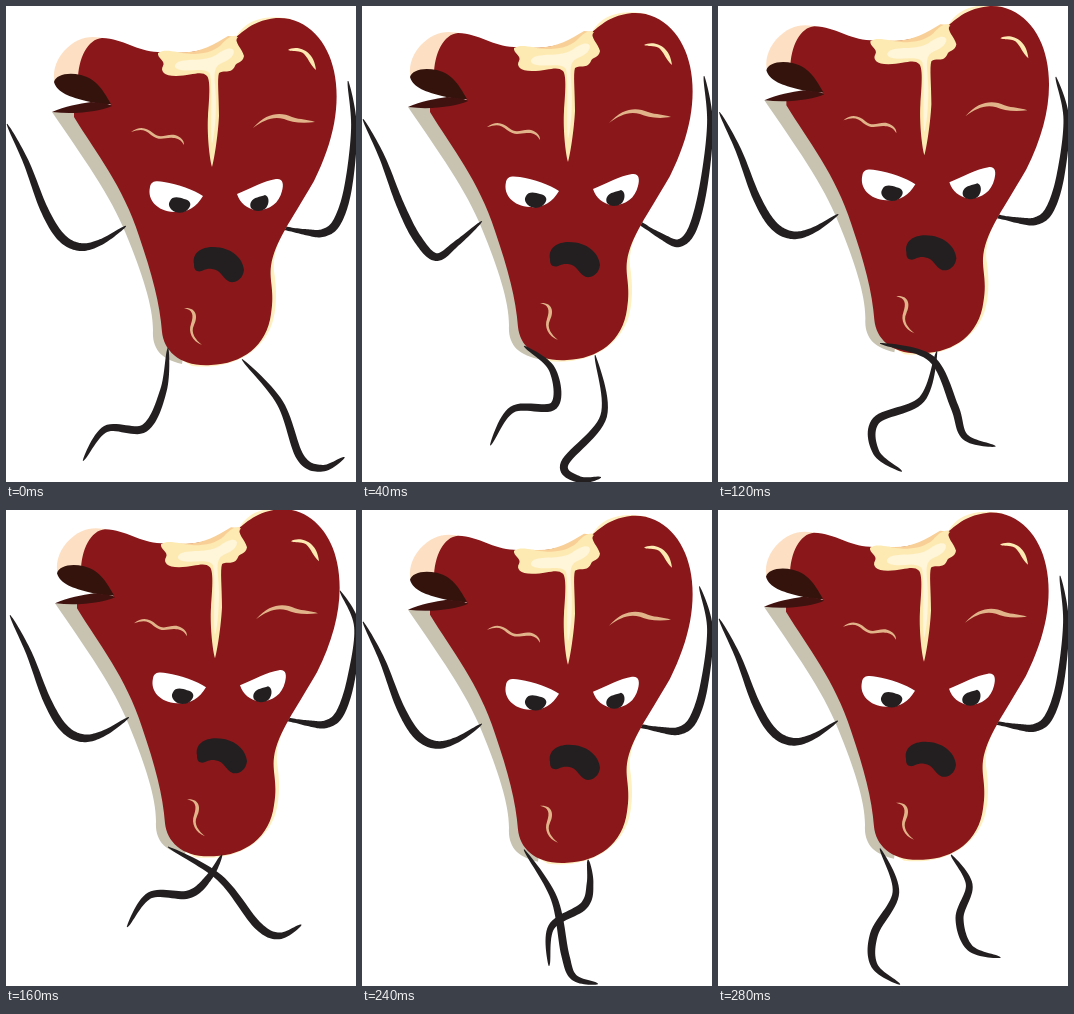
Recreate the animation shown at these times as an HTML page with a canvas. Size 350 by 476 pixels, loop 320 ms.

```html
<!DOCTYPE html>
<html lang="en">
<head>
<meta charset="utf-8">
<title>Walking steak</title>
<style>
html, body { margin: 0; width: 100%; height: 100%; overflow: hidden; background: #fff; }
canvas { display: block; width: 350px; height: 476px; }
</style>
</head>
<body>
<canvas id="stage"></canvas>
<script>
const W = 350, H = 476, STEP = 40, STEPS = 8;
const INK = '#231f20', RED = '#8a171a', CREAM = '#fff0c2', PEACH = '#fde0c4', TAN = '#e2b48a';
const { sin, cos, PI, max } = Math;

const canvas = document.getElementById('stage');
const ctx = canvas.getContext('2d');
const dpr = window.devicePixelRatio || 1;
canvas.width = W * dpr;
canvas.height = H * dpr;

// Fill and path, painted from back to front.
const shapes = [
  [CREAM, `M230 31C240 13 260 8 285 13L310 160L281 220C270 238 267 252 268 265
    C271 283 271 303 266 318C255 348 224 364 186 360L160 345Z`],
  [PEACH, `M101 33C85 29 72 30 58 45C49 55 46 68 49 77L78 73Z`],
  ['#c7c3b0', `M46 106C76 150 105 190 120 228C136 267 147 300 147 324
    C146 342 154 353 176 358L180 330L110 160L72 107Z`],
  [RED, `M96 32C118 33 130 45 152 46C185 50 205 42 222 36C235 30 242 15 270 12
    C300 10 322 35 328 65C335 98 328 135 308 175C285 215 269 235 265 260
    C263 275 269 285 265 308C261 340 236 358 205 359C174 361 158 345 156 326
    C154 298 146 268 133 230C117 180 90 147 68 111L68 105L105 99
    C92 90 82 82 72 75C72 52 82 33 96 32Z`],
  ['#35130d', `M48 76C50 69 61 66 75 69C92 73 99 88 105 98C98 99 89 97 80 95C65 91 51 87 48 76Z`],
  ['#3f120f', `M46 106C59 100 73 98 85 96C94 97 102 97 106 100C95 105 70 109 46 106Z`],
  ['#f8cf96', `M170 46C193 48 207 39 222 30L232 31L222 46L190 53Z`],
  ['#fdeab2', `M152 47C160 42 170 47 185 48C197 48 207 46 215 39C221 32 227 29 231 30
    C228 37 236 42 238 50C237 57 230 56 229 60C225 69 218 63 213 67
    C211 73 213 90 213 110C212 130 208 155 206 161C203 150 201 125 202 110
    C203 95 205 75 201 70C195 64 186 70 170 70C158 70 154 65 157 60C160 55 151 52 152 47Z`],
  ['#fff5d8', `M172 56C182 52 198 56 210 49C218 43 226 40 228 45C228 52 220 55 214 58
    C205 63 210 76 210 96C210 115 208 132 206 138C204 122 207 82 204 68
    C199 61 187 66 175 64C168 63 167 59 172 56Z`],
  ['#fdeab2', `M282 44C290 39 308 43 310 64C304 59 302 51 297 47C291 44 286 46 282 44Z`],
  [TAN, `M247 122C261 106 275 106 286 111C295 114 301 113 309 116C295 118 285 116 278 113C267 110 258 114 247 122Z`],
  [TAN, `M125 126C134 119 141 122 147 127C155 134 161 127 169 129C175 131 178 134 178 139
    C175 134 172 132 167 132C159 131 154 136 145 129C139 123 134 123 125 126Z`],
  [TAN, `M178 302C191 301 192 311 188 319C184 327 190 334 196 339C186 335 182 326 185 318C188 309 187 304 178 302Z`],
  ['#fff', `M144 181C145 174 152 175 158 176C172 178 188 184 197 190C190 202 180 207 168 206C151 205 141 194 144 181Z`],
  ['#fff', `M231 188C245 182 258 175 270 173C277 172 278 178 276 185C273 198 262 205 250 204C241 203 234 197 231 188Z`],
  [INK, `M164 195C166 190 173 191 178 193C184 194 186 198 183 202C179 208 170 208 166 204C163 201 162 198 164 195Z`],
  [INK, `M245 196C248 191 254 191 259 189C263 190 264 197 260 202C256 206 248 206 245 202C244 200 244 198 245 196Z`],
  [INK, `M188 258C186 247 195 241 207 241C225 241 237 252 238 264C237 273 230 277 224 276
    C216 273 216 264 206 263C198 262 196 267 191 265C188 264 188 260 188 258Z`]
].map(([fill, d]) => [fill, new Path2D(d)]);

// Stride of one toe around the pivot; the other leg is half a cycle behind.
const PIVOT = [209, 342];
const toePath = [[-110, 94], [-78, 94], [-22, 114], [71, 102], [108, 91], [29, 125], [27, 132], [-26, 128]];

// Point on a Catmull-Rom segment.
function spline(a, b, c, d, t) {
  return 0.5 * (2 * b + (c - a) * t + (2 * a - 5 * b + 4 * c - d) * t * t
    + (3 * b - a - 3 * c + d) * t * t * t);
}

function sample(knots) {
  const n = knots.length, out = [];
  const at = (i, k) => knots[max(0, Math.min(n - 1, i))][k];
  for (let s = 0; s <= (n - 1) * 14; s++) {
    const i = Math.min(n - 2, Math.floor(s / 14)), t = s / 14 - i;
    out.push([0, 1].map(k => spline(at(i - 1, k), at(i, k), at(i + 1, k), at(i + 2, k), t)));
  }
  return out;
}

// A brush stroke that swells in the middle; endWidth can keep the last end blunt.
function limb(knots, width, endWidth = 0.6) {
  const pts = sample(knots), last = pts.length - 1;
  const left = [], right = [];
  pts.forEach(([x, y], i) => {
    const a = pts[max(0, i - 1)], b = pts[Math.min(last, i + 1)];
    const dx = b[0] - a[0], dy = b[1] - a[1], len = Math.hypot(dx, dy) || 1;
    const u = i / last;
    const r = max(width * max(0, sin(PI * u)) ** 0.55, u > 0.5 ? endWidth : 0.8) / 2;
    left.push([x - dy / len * r, y + dx / len * r]);
    right.unshift([x + dy / len * r, y - dx / len * r]);
  });
  ctx.beginPath();
  left.concat(right).forEach(([x, y]) => ctx.lineTo(x, y));
  ctx.closePath();
  ctx.fillStyle = INK;
  ctx.fill();
}

// Middle of a and b, pushed sideways by a share of their distance.
function bow([ax, ay], [bx, by], share) {
  return [(ax + bx) / 2 + (by - ay) * share, (ay + by) / 2 - (bx - ax) * share];
}

function leg(hip, phase, reach) {
  const toe = toePath[phase].map((v, k) => PIVOT[k] + v * reach);
  const degrees = phase < 4 ? -28 - 4 * phase ** 3 : -180 + 21 * (phase - 4);
  const pitch = degrees * PI / 180;
  const foot = 57 + 18 * cos((phase - 1) * PI / 4);
  const heel = [toe[0] + foot * cos(pitch), toe[1] + foot * sin(pitch)];
  const knee = bow(hip, heel, phase % 2 ? 0.22 : 0.09);
  limb([hip, knee, heel, bow(heel, toe, -0.25), toe], 8);
}

function draw(step) {
  const angle = step * PI / 4;
  const wide = cos(angle);
  // An eased rise over the first stride, a drop, then a steady climb.
  const bob = step <= 4 ? -12.8 * sin(angle / 2) : -3.1 * (step - 4);
  const sway = 3 * max(0, -wide) ** 6;
  const dip = 15 * max(0, sin(2 * angle));
  const tuck = max(0, -cos(angle - PI / 8));

  ctx.setTransform(dpr, 0, 0, dpr, 0, 0);
  ctx.fillStyle = '#fff';
  ctx.fillRect(0, 0, W, H);

  ctx.save();
  ctx.translate(sway, bob);
  limb([[342 - 12 * tuck, 75 + 20 * tuck], [348, 122 + 8 * tuck], [342, 182],
    [331, 216 + dip * 0.7], [317, 227 + dip], [299, 226 + dip * 0.6], [278, 222]], 8.5, 4);
  for (const [fill, path] of shapes) {
    ctx.fillStyle = fill;
    ctx.fill(path);
  }
  limb([[1, 118], [20, 156], [38, 203], [55, 231 + dip * 0.4],
    [74, 241 + dip], [95, 236 + dip * 0.4], [120, 220]], 8.5);
  ctx.restore();

  const reach = 1 + 0.2 * wide ** 5;
  const hipX = 226 + 10 * wide;
  leg([hipX, 358 + bob - (hipX - 205) ** 2 / 200], (step + 4) % STEPS, reach);
  leg([162, 342 + bob * 0.4], step, reach);
}

const start = performance.now();
function tick() {
  draw(Math.floor((performance.now() - start) / STEP) % STEPS);
  requestAnimationFrame(tick);
}
tick();
</script>
</body>
</html>
```
